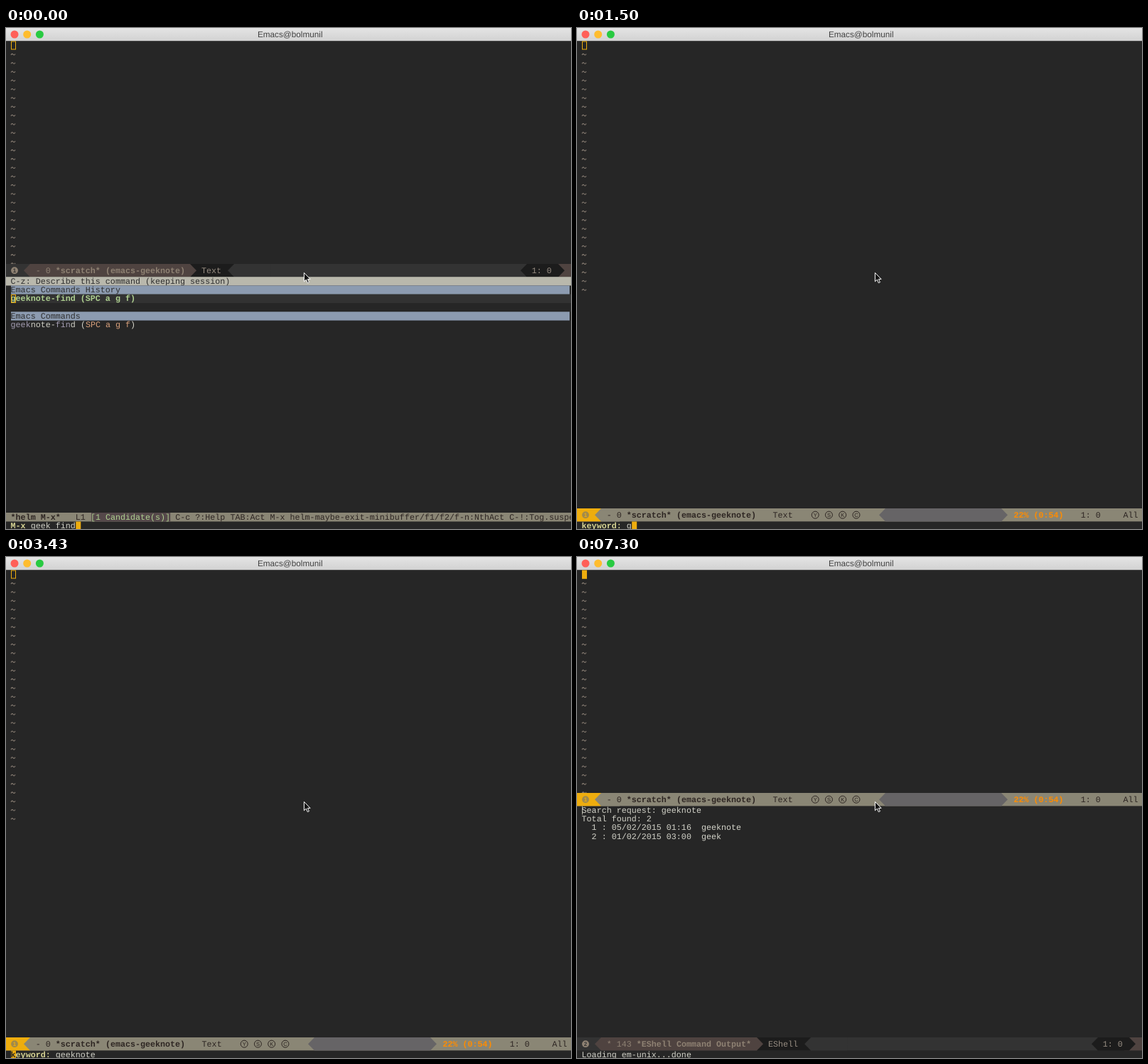
Recreate the animation shown at these times as an HTML page. Size 795 px wide and 705 px high, loop 8000 ms.

```html
<!DOCTYPE html>
<html lang="en">
<head>
<meta charset="utf-8">
<title>Emacs geeknote</title>
<style>
html, body { margin: 0; width: 100%; height: 100%; overflow: hidden; background: #262626; }
svg { display: block; width: 795px; height: 705px; }
text { font: 11.7px "Liberation Mono", "DejaVu Sans Mono", monospace; white-space: pre; text-rendering: geometricPrecision; }
.b { font-weight: bold; }
.title { font: 11.75px "Liberation Sans", Arial, sans-serif; }
.badge { font: bold 8px "Liberation Sans", Arial, sans-serif; }
.lighter { font: 7.6px "Liberation Sans", Arial, sans-serif; }
</style>
</head>
<body>
<script>
const LOOP = 8000, CHAR = 7.02, LEFT = 6.6, LINE = 12.27;
const BG = '#262626', GOLD = '#eead0e', FG = '#d3d3c9', INK = '#2d2522',
      BAR = '#8a8675', BROWN = '#4f4340', DIM = '#8f8273', DARK = '#1c1c1c',
      IDLE = '#333', KHAKI = '#d8d594', GREEN = '#aed090', MATCH = '#a49db2',
      SALMON = '#d8a07c', BLUE = '#8c9bb0';
const rules = [];

const col = n => LEFT + n * CHAR;
const rowTop = n => 350.2 + n * LINE;
const rect = (x, y, w, h, fill) => `<rect x="${x}" y="${y}" width="${w}" height="${h}" fill="${fill}"/>`;
const poly = (points, fill) => `<polygon points="${points}" fill="${fill}"/>`;
const put = (x, y, str, fill, cls = '') => `<text x="${x}" y="${y}" fill="${fill}" class="${cls}">${str}</text>`;
const text = (c, y, str, fill, cls) => put(col(c), y, str, fill, cls);
const line = (n, c, str, fill, cls) => text(c, rowTop(n) + 9.7, str, fill, cls);
const mid = (x, y, str, fill, cls) =>
  `<text x="${x}" y="${y}" fill="${fill}" class="${cls}" text-anchor="middle">${str}</text>`;
const hollow = (x, y) => `<rect x="${x + .5}" y="${y + .5}" width="6" height="11" fill="none" stroke="${GOLD}"/>`;

// Shows a group between two times of the loop
function show(from, to, body) {
  const name = 's' + rules.length, pc = ms => ms / LOOP * 100 + '%';
  let frames = from > 0 ? '0%{opacity:0}' : '';
  frames += `${pc(from)}{opacity:1}` + (to < LOOP ? `${pc(to)}{opacity:0}100%{opacity:0}` : '100%{opacity:1}');
  rules.push(`@keyframes ${name}{${frames}} .${name}{animation:${name} ${LOOP}ms step-end infinite}`);
  return `<g class="${name}">${body}</g>`;
}

// Segment of a mode line; each end points left (-1), right (1) or is flat (0)
function segment(x1, x2, y, fill, start = 0, end = 0) {
  const h = 18.4, tip = 9;
  const a = start < 0 ? x1 + tip : x1, b = end > 0 ? x2 - tip : x2;
  return poly(`${a},${y} ${b},${y} ${x2},${y + h / 2} ${b},${y + h} ${a},${y + h} ${x1},${y + h / 2}`, fill);
}

const badge = (y, n, fill, back) =>
  `<circle cx="12" cy="${y + 9.2}" r="4.9" fill="${fill}"/>` + mid(12, y + 12.1, n, back, 'badge');

function activeBar(y) {
  const base = y + 13;
  let s = rect(0, y, 795, 18.4, BAR) + rect(0, y, 34, 18.4, GOLD) + segment(25, 60, y, BAR, -1);
  s += badge(y, 1, '#a08a4c', GOLD);
  s += text(5, base, '- 0', INK) + text(9, base, '*scratch* (emacs-geeknote)', INK, 'b');
  s += put(275.6, base, 'Text', INK);
  [...'YSKC'].forEach((c, i) => {
    const x = 335.2 + i * 19.25;
    s += `<circle cx="${x}" cy="${y + 9.2}" r="5" fill="none" stroke="${INK}"/>` + mid(x, y + 12, c, INK, 'lighter');
  });
  s += segment(425, 606, y, '#666466', -1, 1);
  s += put(614.4, base, '22% (0:54)', '#ff8c00', 'b');
  return s + put(708.8, base, '1: 0', INK) + put(768.6, base, 'All', INK);
}

function idleBar(y, num, size, name, end, mode) {
  const base = y + 13, modeX = end + 7, tip = modeX + mode.length * CHAR + 9;
  let s = rect(0, y, 795, 18.4, IDLE) + badge(y, num, DIM, IDLE);
  s += rect(end - 9, y, tip - end + 18, 18.4, DARK);
  s += segment(25, end, y, BROWN, -1, 1) + segment(tip, tip + 60, y, IDLE, -1);
  s += text(5, base, size, DIM) + text(size.length + 6, base, name, DIM, 'b');
  s += put(modeX, base, mode, '#978d82');
  s += rect(770, y, 25, 18.4, BROWN) + segment(724, 786, y, DARK, -1, 1);
  return s + put(739.8, base, '1: 0', '#978d82');
}

const cursor = c => rect(col(c) + .4, 694.5, 7, 10.5, GOLD);
const echo = (c, str, fill = FG, cls) => text(c, 704.2, str, fill, cls);

function titleBar() {
  let s = rect(0, 0, 795, 18.2, 'url(#metal)');
  ['#ff5f57', '#ffbd2e', '#28ca41'].forEach((c, i) => {
    s += `<circle cx="${12 + i * 17.7}" cy="9" r="5.5" fill="${c}"/>`;
  });
  return s + mid(399.7, 13.2, 'Emacs@bolmunil', '#424242', 'title');
}

function tildes() {
  let s = '';
  for (let i = 0; i < 28; i++)
    s += `<path d="M7 ${38 + i * LINE}q1.5 -2.8 3 -.8t3 -.8" fill="none" stroke="#877c72" stroke-width="1.1"/>`;
  return s;
}

function helm() {
  const head = (n, str) => rect(7, rowTop(n), 786, LINE, BLUE) + line(n, 0, str, '#2e2e2e');
  let s = rect(0, 332, 795, 373, BG);
  s += idleBar(332, 1, '- 0', '*scratch* (emacs-geeknote)', 268, 'Text');
  s += rect(0, rowTop(0), 795, LINE, '#b9b8ac');
  s += line(0, 0, 'C-z: Describe this command (keeping session)', '#2e2e2e');
  s += head(1, 'Emacs Commands History');
  s += rect(7, rowTop(2), 788, LINE, '#323232') + line(2, 0, 'geeknote-find (SPC a g f)', GREEN, 'b') + hollow(7, 375);
  s += head(4, 'Emacs Commands');
  s += line(5, 0, 'geek', MATCH) + line(5, 4, 'note-', FG) + line(5, 9, 'fin', MATCH);
  s += show(0, 150, line(5, 12, 'd', FG)) + show(150, LOOP, line(5, 12, 'd', MATCH));
  s += line(5, 14, '(', FG) + line(5, 15, 'SPC a g f', SALMON) + line(5, 24, ')', FG);
  s += rect(0, 682, 795, 12.5, BAR) + rect(col(16) + 1, 682, 16 * CHAR - 1, 12.5, '#55484a');
  s += text(0, 691.8, '*helm M-x*', INK, 'b') + text(13, 691.8, 'L1', INK);
  s += text(16, 691.8, '[1 Candidate(s)]', GREEN);
  s += text(33, 691.8, 'C-c ?:Help TAB:Act M-x helm-maybe-exit-minibuffer/f1/f2/f-n:NthAct C-!:Tog.suspend', INK);
  return s + echo(0, 'M-x', KHAKI, 'b') + echo(4, 'geek find') + cursor(13);
}

function prompt() {
  const steps = [[750, ''], [1500, 'g'], [1800, 'ge'], [1940, 'gee'], [2240, 'geek'],
                 [2530, 'geekno'], [2680, 'geeknot'], [2830, 'geeknote'], [3430]];
  let s = '';
  for (let i = 0; i < steps.length - 1; i++) {
    const [at, typed] = steps[i];
    s += show(at, steps[i + 1][0], echo(0, 'keyword:', KHAKI, 'b') + echo(9, typed) + cursor(9 + typed.length));
  }
  s += show(3430, 3570, cursor(0) + echo(0, 'k', BG, 'b') + echo(1, 'eyword:', KHAKI, 'b') + echo(9, 'geeknote'));
  s += show(3570, 3720, echo(0, 'Loading em-hist...'));
  s += show(3720, 3860, echo(0, 'Loading em-prompt...'));
  return s + show(3860, LOOP, echo(0, 'Loading em-unix...done'));
}

function results() {
  let s = rect(0, 332, 795, 362.5, BG) + activeBar(332);
  s += rect(7, 350.5, 1, 12, '#b5b5a8');
  ['Search request: geeknote', 'Total found: 2',
   '  1 : 05/02/2015 01:16  geeknote', '  2 : 01/02/2015 03:00  geek'
  ].forEach((str, i) => { s += line(i, 0, str, FG); });
  return s + idleBar(676, 2, '* 143', '*EShell Command Output*', 262, 'EShell');
}

const arrow = '<path d="M419.4 344.4v12.4l2.9-2.7 2 4.6 2.1-.9-2-4.4h3.7z" fill="#111" stroke="#fff" stroke-width="1" stroke-linejoin="round"/>';
const beam = '<path d="M416.5 338.5q2.5 0 2.5 2v9q0 2 -2.5 2M421.5 338.5q-2.5 0 -2.5 2v9q0 2 2.5 2" fill="none" stroke="#ddd"/>';

const scene =
  '<defs><linearGradient id="metal" x2="0" y2="1"><stop stop-color="#e4e4e4"/><stop offset="1" stop-color="#d2d2d2"/></linearGradient></defs>' +
  rect(0, 0, 795, 705, BG) + titleBar() + tildes() +
  show(0, 4010, hollow(7, 18.5)) + show(4160, LOOP, rect(7, 18.5, 7, 12.3, GOLD)) +
  show(0, 750, helm()) +
  show(750, 7300, activeBar(676)) +
  show(7300, LOOP, results()) +
  prompt() +
  show(0, 3860, arrow) + show(3860, 4010, beam) + show(4010, LOOP, arrow);

document.head.insertAdjacentHTML('beforeend', `<style>${rules.join('\n')}</style>`);
document.body.insertAdjacentHTML('beforeend', `<svg viewBox="0 0 795 705">${scene}</svg>`);
</script>
</body>
</html>
```
